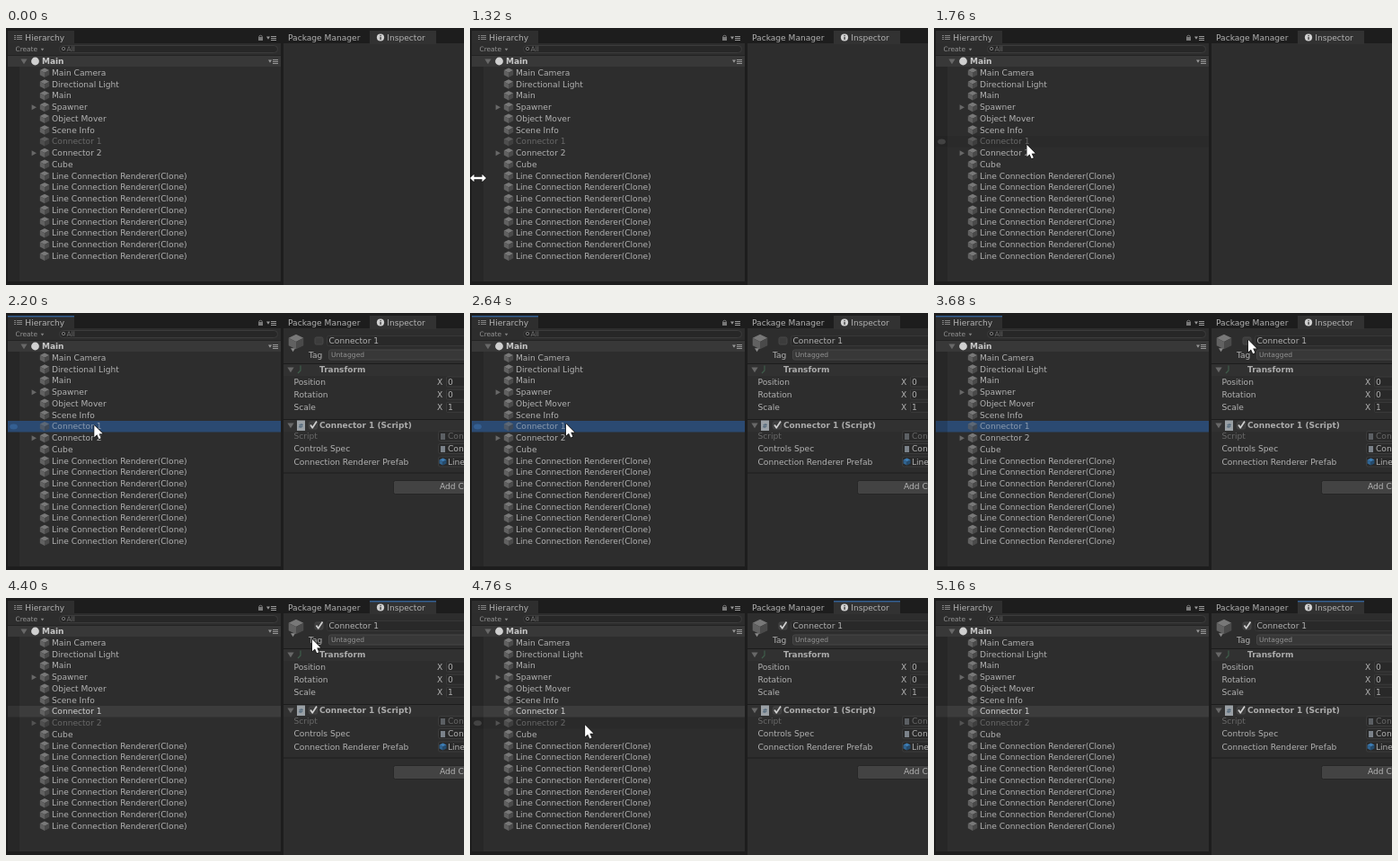
Recreate the animation shown at these times as an HTML page with a canvas. Size 510 by 286 pixels, loop 5200 ms.

```html
<!DOCTYPE html>
<html lang="en">
<head>
<meta charset="utf-8">
<title>Hierarchy and inspector</title>
<style>
  html, body { margin: 0; width: 100%; height: 100%; overflow: hidden; background: #2d2d2d; }
  canvas { display: block; }
</style>
</head>
<body>
<canvas id="stage" width="510" height="286"></canvas>
<script>
const ctx = document.getElementById('stage').getContext('2d');
const LOOP = 5200, STEP = 40;
const APPEAR = 1320, VANISH = 5160;
const SELECT = 2120, INSPECT = 2160, FOCUS = 3760, CHECK = 3840, SWAP = 3920;
const FIRST_ROW = 49.7, PITCH = 12.75, SELECTED = 6;
const PANEL = '#2d2d2d', FIELD = '#292929', EDGE = '#3c3c3c', ICON = '#999';
const BLUE = '#335f92', TEXT = '#b2b2b2', BRIGHT = '#d0d0d0', DIM = '#686868';

const rows = ['Main Camera', 'Directional Light', 'Main', 'Spawner', 'Object Mover',
  'Scene Info', 'Connector 1', 'Connector 2', 'Cube',
  ...Array(8).fill('Line Connection Renderer(Clone)')];

// Each move eases on from the place where the one before it ended.
const moves = [
  { from: 1320, to: 1560, x: 184, y: 181 },
  { from: 1560, to: 1800, x: 97, y: 126 },
  { from: 2120, to: 2360, x: 102, y: 122 },
  { from: 2600, to: 2800, x: 150, y: 134 },
  { from: 2920, to: 3400, x: 370, y: 8 },
  { from: 3400, to: 3680, x: 350, y: 30 },
  { from: 4240, to: 4400, x: 341, y: 46 },
  { from: 4400, to: 4800, x: 122, y: 144 },
  { from: 4800, to: 5120, x: 16, y: 102 }
];

function pointerAt(t) {
  if (t < APPEAR || t >= VANISH) return null;
  const at = { x: 9, y: 167 };
  for (const move of moves) {
    const k = Math.min(1, Math.max(0, (t - move.from) / (move.to - move.from)));
    const ease = k * k * (3 - 2 * k);
    at.x += (move.x - at.x) * ease;
    at.y += (move.y - at.y) * ease;
  }
  return at;
}

function box(x, y, w, h, color) {
  ctx.fillStyle = color;
  ctx.fillRect(x, y, w, h);
}

function rounded(x, y, w, h, r, fill, line) {
  ctx.beginPath();
  ctx.roundRect(x, y, w, h, r);
  ctx.fillStyle = fill;
  ctx.fill();
  ctx.strokeStyle = line;
  ctx.lineWidth = 1;
  ctx.stroke();
}

function label(text, x, middle, color = TEXT, size = 9.1, weight = 'normal') {
  ctx.font = `${weight} ${size}px "DejaVu Sans", sans-serif`;
  ctx.fillStyle = color;
  ctx.fillText(text, x, middle + size * 0.36);
}

function poly(points, fill) {
  ctx.beginPath();
  points.forEach(([x, y]) => ctx.lineTo(x, y));
  ctx.closePath();
  ctx.fillStyle = fill;
  ctx.fill();
}

function stroke(points, color, width) {
  ctx.beginPath();
  points.forEach(([x, y]) => ctx.lineTo(x, y));
  ctx.strokeStyle = color;
  ctx.lineWidth = width;
  ctx.stroke();
}

function ring(x, y, r, color, start = 0) {
  ctx.beginPath();
  ctx.arc(x, y, r, start, 2 * Math.PI);
  ctx.strokeStyle = color;
  ctx.lineWidth = 1;
  ctx.stroke();
}

function disc(x, y, rx, ry, color) {
  ctx.beginPath();
  ctx.ellipse(x, y, rx, ry, 0, 0, 7);
  ctx.fillStyle = color;
  ctx.fill();
}

function down(x, y, r, color = DIM) {
  poly([[x - r, y - r * 0.7], [x + r, y - r * 0.7], [x, y + r * 0.9]], color);
}

function right(x, y, r, color = DIM) {
  poly([[x - r * 0.8, y - r], [x + r, y], [x - r * 0.8, y + r]], color);
}

function cube(x, y, r, saturation = 0) {
  const h = r / 2;
  const shade = light => `hsl(208 ${saturation}% ${light}%)`;
  poly([[x, y - r], [x + r, y - h], [x, y], [x - r, y - h]], shade(47));
  for (const [side, light] of [[-1, 38], [1, 29]]) {
    poly([[x + side * r, y - h], [x, y], [x, y + r], [x + side * r, y + h]], shade(light));
  }
}

function bars(x, y, w, color) {
  for (let i = 0; i < 3; i++) box(x, y + i * 2, w, 1, color);
}

function menu(x, y) {
  down(x + 2, y, 2, ICON);
  bars(x + 5, y - 2, 6, ICON);
}

function checkbox(x, y, checked) {
  rounded(x + 0.5, y + 0.5, 9, 8, 1.5, '#3c3c3c', '#484848');
  if (checked) stroke([[x + 2, y + 4], [x + 4.2, y + 7.3], [x + 9, y]], BRIGHT, 1.7);
}

function tab(x, text, active, fill) {
  box(x, 3, 74, 15, fill);
  if (active) box(x, 3, 74, 1.5, BLUE);
  label(text, x + 19.3, 11, TEXT);
}

function drawRow(name, i, t, hovered) {
  const y = FIRST_ROW + i * PITCH;
  const focused = t >= SELECT && t < FOCUS;
  const selected = i === SELECTED && t >= SELECT;
  const lit = selected && focused;
  const inactive = i === (t < SWAP ? SELECTED : SELECTED + 1);

  if (selected) {
    box(2, y - 6.2, 304, 12.5, focused ? '#2b4a72' : '#3c3c3c');
    if (!hovered) box(2, y - 6.2, 13, 12.5, 'rgba(0,0,0,.15)');
  } else if (hovered) {
    box(2, y - 6.2, 304, 12.5, 'rgba(0,0,0,.07)');
  }
  if (hovered) disc(8.5, y + 0.3, 4.4, 3, lit ? '#345f92' : '#434343');

  ctx.globalAlpha = inactive ? 0.65 : 1;
  if (i === 3 || i === 7) right(31, y + 0.2, 3);
  cube(43, y, 5.2);
  ctx.globalAlpha = 1;
  label(name, 51, y, lit ? '#8b9bae' : inactive ? DIM : selected ? BRIGHT : TEXT);
}

function drawHierarchy(t, pointer) {
  tab(2, 'Hierarchy', t >= SELECT && t < FOCUS, '#2e2e2e');
  bars(9, 8, 2, '#808080');
  bars(12, 8, 6, '#808080');
  box(281, 10, 5, 4, '#777');
  ring(283.5, 10, 1.8, '#777', Math.PI);
  menu(290, 11);

  box(2, 17, 304, 265, PANEL);
  label('Create', 10.5, 23.5, '#929292', 7.4);
  down(40.5, 24, 1.8, '#808080');
  rounded(59.5, 19.5, 243, 8, 4, '#272727', EDGE);
  ring(64, 23, 1.7, '#777');
  label('All', 67.5, 23.5, '#727272', 7.6);

  box(2, 30, 13, 252, '#272727');
  box(2, 30, 304, 1, '#232323');
  box(2, 31, 304, 12, '#383838');
  down(20, 37, 3.6);
  disc(32.5, 37, 4.4, 4.4, BRIGHT);
  label('Main', 40, 37, '#c8c8c8', 9, 'bold');
  menu(292, 37);

  const inside = pointer && pointer.x > 14 && pointer.x < 306;
  const hover = inside ? Math.round((pointer.y - FIRST_ROW) / PITCH) : -1;
  rows.forEach((name, i) => drawRow(name, i, t, i === hover));
}

function componentHeader(y, title) {
  box(309, y - 7, 201, 1, '#1c1c1c');
  box(309, y - 6, 201, 13, '#313131');
  down(317, y, 3.6);
  label(title, 349, y, '#acacac', 9, 'bold');
}

function objectField(y, name, value, color) {
  label(name, 320.5, y, color);
  rounded(481.5, y - 5.5, 40, 11, 2, FIELD, EDGE);
  label(value, 492, y, color);
}

function drawInspector(t) {
  cube(323, 32, 8.3);
  down(319.5, 41, 2.5, '#8a8a8a');
  checkbox(343.5, 26.5, t >= CHECK);
  rounded(357.5, 25.5, 165, 11, 2, FIELD, '#383838');
  label('Connector 1', 359.5, 31);
  label('Tag', 337, 46.5);
  rounded(359.5, 41, 165, 11, 2, '#383838', '#464646');
  label('Untagged', 362, 46.5, '#929292', 7.6);

  componentHeader(63, 'Transform');
  stroke([[328, 58.5], [328, 64], [325, 67]], '#3f5d4b', 1.2);
  ['Position', 'Rotation', 'Scale'].forEach((name, i) => {
    const y = 76.5 + i * 14.2;
    label(name, 320.5, y);
    label('X', 480, y);
    rounded(490.5, y - 5.5, 30, 11, 1, FIELD, EDGE);
    label(name === 'Scale' ? '1' : '0', 492, y);
  });

  componentHeader(125, 'Connector 1 (Script)');
  box(324, 119.5, 9, 11.5, '#9aa0a5');
  label('#', 325.5, 125.5, '#4d6478', 7, 'bold');
  checkbox(337, 120.5, true);
  objectField(137, 'Script', 'Connector1', DIM);
  box(484, 134, 5, 7, '#5c6064');
  objectField(151, 'Controls Spec', 'Controls', TEXT);
  box(484, 148, 5, 7, '#7b828a');
  objectField(165.5, 'Connection Renderer Prefab', 'Line Connection', TEXT);
  cube(486.5, 165.5, 4, 50);
  box(309, 177.5, 201, 1, '#1e1e1e');
  rounded(431.5, 186.5, 100, 15, 2, '#434343', '#262626');
  label('Add Component', 483, 193);
}

function drawPointer({ x, y }) {
  const half = [[4.5, -1.2], [4.5, -4.2], [9, 0], [4.5, 4.2], [4.5, 1.2]];
  const resize = [...half, ...half.map(([dx, dy]) => [-dx, -dy])];
  const arrow = [[0, 0], [0, 13.2], [3, 10.4], [5.2, 15.3], [7.4, 14.3], [5.2, 9.6], [9.4, 9.4]];
  const points = (x < 14 ? resize : arrow).map(([dx, dy]) => [x + dx, y + dy]);
  ctx.lineJoin = 'round';
  stroke([...points, points[0]], '#171717', 1.4);
  poly(points, '#fff');
}

function draw(t) {
  const pointer = pointerAt(t);
  box(0, 0, 510, 286, '#1d1d1d');
  drawHierarchy(t, pointer);
  box(309, 17, 201, 269, PANEL);
  label('Package Manager', 314, 11);
  tab(405, 'Inspector', t >= FOCUS, '#323232');
  disc(417, 10.5, 4.1, 4.1, BRIGHT);
  box(416.5, 8, 1.2, 1.2, PANEL);
  box(416.5, 10, 1.2, 3, PANEL);
  if (t >= INSPECT) drawInspector(t);
  if (pointer) drawPointer(pointer);
}

const start = performance.now();
function tick() {
  const t = (performance.now() - start) % LOOP;
  draw(Math.floor(t / STEP) * STEP);
  requestAnimationFrame(tick);
}
tick();
</script>
</body>
</html>
```
